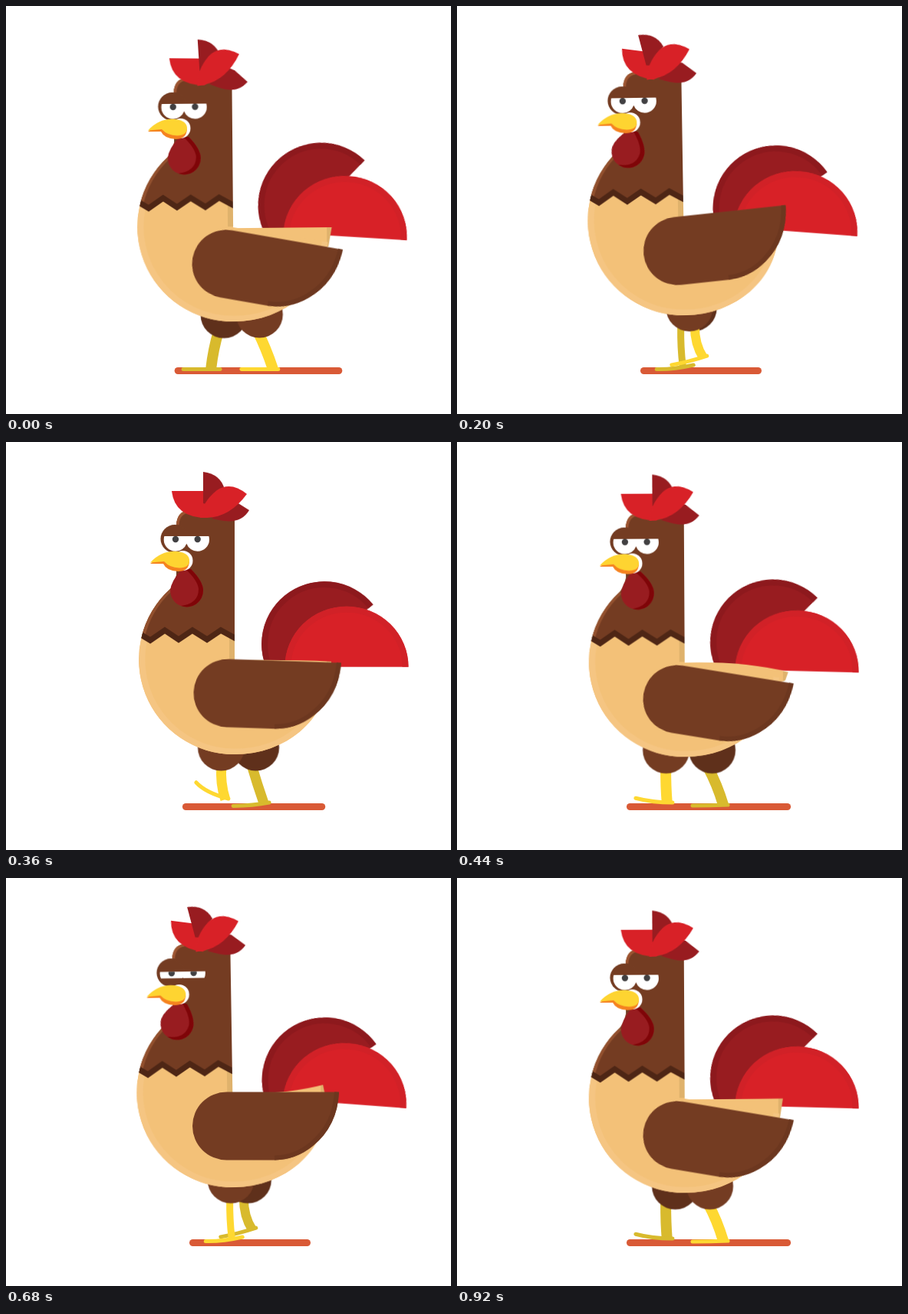
Write an HTML page without scripts that moves like this. It is 580 px wide and 533 px high and loops after 960 ms.

```html
<!DOCTYPE html>
<html lang="en">
<head>
<meta charset="utf-8">
<title>Walking rooster</title>
<style>
html, body { margin: 0; width: 100%; height: 100%; overflow: hidden; background: #fff; }
svg { display: block; width: 580px; height: 533px; }
path, polyline { fill: none; }

/* The body bobs once per step; legs, wings and eyelids need two steps. */
svg * { animation: 480ms linear infinite; }
.body { transform-origin: 290px 330px; animation-name: bob; }
.shadow { stroke: #d95a36; stroke-width: 9; stroke-linecap: round; animation-name: shadow; }
.tail-front { transform-origin: 444px 293px; animation-name: tail-front; }
.tail-back { transform-origin: 415px 264px; animation-name: tail-back; }
.comb path { transform-origin: 258px 99px; }
.comb .left { animation-name: comb-left; }
.comb .mid { animation-name: comb-mid; }
.comb .back { animation-name: comb-back; }
.comb .low { transform-origin: 283px 100px; animation-name: comb-low; }
.wattle { transform-origin: 235px 165px; animation-name: wattle; }

.wing, .far-wing, .shin, .foot, .thigh, .slot { animation-duration: 960ms; }
.wing { transform-origin: 287.5px 324px; animation-name: wing; }
.far-wing { fill: url(#feather); animation-name: far-wing; }
.shin { stroke: var(--skin); animation-name: shin; }
.foot { stroke: var(--skin); stroke-width: 5; stroke-linecap: round; animation-name: foot; }
.near { --skin: #fed831; --thigh: #743c22; }
.far { --skin: #d8ba2d; --thigh: #5f301b; }
.far .shin, .far .foot { animation-delay: -480ms; }
.thigh { fill: var(--thigh); animation-name: near-thigh; }
.far .thigh { animation-name: far-thigh; }
.slot { animation-name: blink; }

.red { fill: #d82127; }
.dark { fill: #981c20; }
.wine { fill: #7f0508; }
.brown { fill: #743c22; }
.orange { fill: #f5821f; }
.yellow { fill: #fed431; }
.rim { stroke-width: 8; }

@keyframes bob {
  0%, 100% { transform: translate(-1.5px, 4.3px) rotate(-.5deg); }
  25% { transform: translate(-2.8px, -.2px) rotate(-1deg); }
  41.67% { transform: translate(-2px, -3.8px) rotate(-.9deg); }
  50% { transform: translate(-1.5px, -4.4px) rotate(-.7deg); }
  75% { transform: none; }
  91.67% { transform: translate(-1px, 3.3px) rotate(-.3deg); }
}
@keyframes shadow {
  0%, 100% { d: path("M224 476.5H434"); }
  41.67% { d: path("M243.5 476.5H392.5"); }
  50% { d: path("M243 476.5H392"); }
  75% { d: path("M234.5 476.5H411.5"); }
  91.67% { d: path("M225.5 476.5H430.5"); }
}
@keyframes tail-front {
  0%, 100% { transform: translate(-2px, 7.3px) rotate(3.5deg); }
  25% { transform: translate(-3px, 3.7px) rotate(4.9deg); }
  41.67% { transform: translate(-2.7px, 1px) rotate(4.3deg); }
  50% { transform: translate(-2.2px, .2px) rotate(3.5deg); }
  75% { transform: none; }
  91.67% { transform: translate(-1px, 5.3px) rotate(1.4deg); }
}
@keyframes tail-back {
  0%, 100% { transform: translate(-4.5px, -3.5px) rotate(-7deg); }
  41.67% { transform: translate(.5px, 0) rotate(4deg); }
  50% { transform: translate(.7px, .3px) rotate(4deg); }
  75% { transform: none; }
  91.67% { transform: translate(-3px, -2.5px) rotate(-6deg); }
}
@keyframes comb-left {
  0%, 100% { transform: rotate(1deg); }
  33%, 41.67% { transform: rotate(8deg); }
  75%, 91.67% { transform: none; }
}
@keyframes comb-mid {
  0%, 100% { transform: rotate(-10deg); }
  41.67% { transform: rotate(-8deg); }
  75% { transform: none; }
  91.67% { transform: rotate(-6deg); }
}
@keyframes comb-back {
  0%, 100% { transform: rotate(-3deg); }
  33%, 41.67% { transform: rotate(-14deg); }
  75%, 91.67% { transform: none; }
}
@keyframes comb-low {
  0%, 100% { transform: rotate(10deg); }
  41.67% { transform: rotate(5deg); }
  75% { transform: none; }
  91.67% { transform: rotate(6deg); }
}
@keyframes wattle {
  0%, 100% { transform: rotate(1deg); }
  41.67% { transform: rotate(17deg); }
  75% { transform: none; }
  91.67% { transform: rotate(-3deg); }
}
@keyframes wing {
  0%, 100% { transform: translate(-.5px, 13px) rotate(10deg); }
  20.83% { transform: translate(0, -4px) rotate(-6.2deg); }
  37.5% { transform: translate(1.5px, 4px) rotate(1.8deg); }
  45.83% { transform: translate(-.5px, 12px) rotate(9.2deg); }
  50% { transform: translate(-.5px, 13px) rotate(10deg); }
  70.83% { transform: none; }
  87.5% { transform: translate(1px, 6px) rotate(5.3deg); }
  95.83% { transform: translate(-.5px, 12px) rotate(9.5deg); }
}
@keyframes far-wing {
  0%, 100% { d: path("M298 286Q365 286 426.5 286L422 311L330 350Z"); }
  20.83% { d: path("M298 286Q370 286 423 280L420 300L330 350Z"); }
  37.5% { d: path("M298 285Q370 284 424 286.5L421 302L330 350Z"); }
  45.83% { d: path("M298 285Q375 283 433 298L429 309L330 350Z"); }
  70.83% { d: path("M298 286Q367 288 416 276L419 292L330 350Z"); }
  87.5% { d: path("M298 286Q370 286 421 279L423 298L330 350Z"); }
  95.83% { d: path("M298 286Q365 286 426 285.5L422 311L330 350Z"); }
}
@keyframes shin {
  0%, 100% { d: path("M328 425Q339 447 348 474"); stroke-width: 14; }
  20.83% { d: path("M310 418Q310 442 321 459"); stroke-width: 12; }
  37.5% { d: path("M281 422Q279 446 286 467"); stroke-width: 13; }
  45.83% { d: path("M272 425Q272 450 274 472"); stroke-width: 14; }
  50% { d: path("M277 425Q270 448 267 474"); stroke-width: 14; }
  70.83% { d: path("M291.5 420Q291 446 294 471"); stroke-width: 9; }
  87.5% { d: path("M320 422Q327 446 336 472"); stroke-width: 13; }
  95.83% { d: path("M327 425Q339 447 347 474"); stroke-width: 14; }
}
@keyframes foot {
  0%, 100% { d: path("M355 474.5Q330 474.5 307 474.5"); }
  20.83% { d: path("M326 457Q302 465 280 469"); }
  37.5% { d: path("M290 466Q260 458 248 444.5"); }
  45.83% { d: path("M281 471Q255 471 233 465"); }
  50% { d: path("M279 474.5Q255 474.5 231 474.5"); }
  70.83% { d: path("M308 469Q282 475 260 474.5"); }
  87.5% { d: path("M343 471Q322 475 296 475.5"); }
  95.83% { d: path("M353 474Q330 475 307 475"); }
}
@keyframes near-thigh {
  0%, 100% { transform: translate(330.5px, 403px); }
  20.83% { transform: translate(303px, 394.5px); }
  25% { transform: translate(297px, 394px); }
  37.5% { transform: translate(280.5px, 399px); }
  45.83% { transform: translate(272.5px, 402.5px); }
  50% { transform: translate(274px, 403.5px); }
  70.83% { transform: translate(293px, 394.5px); }
  75% { transform: translate(300px, 394px); }
  87.5% { transform: translate(321.5px, 399px); }
  95.83% { transform: translate(329.5px, 402.5px); }
}
@keyframes far-thigh {
  0%, 100% { transform: translate(284px, 403.5px); }
  20.83% { transform: translate(308px, 394.5px); }
  25% { transform: translate(313px, 394px); }
  37.5% { transform: translate(325.5px, 399px); }
  45.83% { transform: translate(332.5px, 402.5px); }
  50% { transform: translate(333px, 403.5px); }
  70.83% { transform: translate(315.5px, 394.5px); }
  75% { transform: translate(311px, 394px); }
  87.5% { transform: translate(291.5px, 399px); }
  95.83% { transform: translate(284.5px, 402.5px); }
}
@keyframes blink {
  0%, 62.5%, 83.33%, 100% { y: 123px; height: 22px; }
  70.83%, 75% { y: 125.3px; height: 8.5px; }
}
</style>
</head>
<body>
<svg viewBox="0 0 580 533">
  <defs>
    <linearGradient id="feather">
      <stop offset=".95" stop-color="#f3c178"/>
      <stop offset=".95" stop-color="#dfb26c"/>
    </linearGradient>
    <clipPath id="torso">
      <path d="M298 285V89H238Q223 91 222 108V174Q220 185 214 192A124 124 0 0 0 298 408C366 408 417 362 421 305Z"/>
    </clipPath>
    <clipPath id="eyes">
      <circle cx="221" cy="127.5" r="15.3"/>
      <circle cx="249.7" cy="127.5" r="15.3"/>
    </clipPath>
    <clipPath id="lids">
      <rect class="slot" x="200" y="123" width="70" height="22"/>
    </clipPath>
  </defs>

  <path class="shadow" d="M224 476.5H434"/>

  <g class="far">
    <path class="shin"/><path class="foot"/>
    <circle class="thigh" r="30.5"/>
  </g>
  <g class="near">
    <path class="shin"/><path class="foot"/>
    <circle class="thigh" r="30.5"/>
  </g>

  <g class="tail-back">
    <path class="dark" d="M478.5 212.5A81.5 81.5 0 0 0 351.5 315.5Z"/>
    <path class="rim" stroke="#8d191d" d="M475.5 215A77.5 77.5 0 0 0 354.5 313"/>
  </g>
  <g class="tail-front">
    <path class="red" d="M363.500 293.700A80.500 79 0 0 1 524.500 293.700Z"/>
    <path class="rim" stroke="#d12127" d="M367.500 293.700A76.500 75 0 0 1 520.500 293.700"/>
  </g>

  <g class="body">
    <path class="far-wing"/>
    <g clip-path="url(#torso)">
      <rect x="170" y="85" width="260" height="330" fill="#f3c178"/>
      <path stroke="#f5c582" stroke-width="15" d="M177 256A124 124 0 0 0 298 408C366 408 417 362 421 305"/>
      <path stroke="#dfb26c" stroke-width="7" d="M294.5 250V284"/>
      <path class="brown" d="M170 85H300V256L280 246L262 258L243 246L225 258L207 246L188 259L170 249Z"/>
      <path stroke="#92502e" stroke-width="7" d="M214 192A124 124 0 0 0 177 256"/>
      <path stroke="#9c5431" stroke-width="7" d="M222 108Q223 91 238 89"/>
      <polyline stroke="#4e2615" stroke-width="7.5" points="170,248 188,259 207,246 225,258 243,246 262,258 280,246 300,257"/>
    </g>

    <g class="comb">
      <path class="dark low" d="M268 100L290 75L298 77L317 89Q306 108 278 102Z"/>
      <path class="red left" d="M216 64H262L276 88L262 99Q220 99 216 64Z"/>
      <path class="dark back" d="M257 39Q280 42 285 62L264 82L257 80Z"/>
      <path class="red mid" d="M253 99Q256 78 275 63Q293 51 314 68Q292 98 262 99Z"/>
    </g>

    <circle class="brown" cx="220" cy="126.5" r="18.5"/>
    <g clip-path="url(#lids)">
      <g clip-path="url(#eyes)">
        <rect x="200" y="110" width="70" height="36" fill="#fff"/>
        <circle cx="221" cy="127" r="4.2" fill="#414042"/>
        <circle cx="249.7" cy="127" r="4.2" fill="#414042"/>
      </g>
    </g>

    <g class="wattle">
      <path class="dark" d="M229 166H241Q257 182 257 194A21.3 21.3 0 0 1 214 194Q215 182 229 166Z"/>
      <path class="wine" d="M234 166H241Q257 182 257 194A21.3 21.3 0 0 1 228 214Q251 211 251 192Q250 181 234 166Z"/>
    </g>
    <circle cx="230.5" cy="155" r="13" fill="#fff"/>
    <path class="orange" d="M188 159Q200 148 225 150L239 155Q239 169 224 169Q209 168 205 159Z"/>
    <path class="yellow" d="M188 157.5Q203 141 224 143Q239 145 239 155Q239 164 226 164.5Q213 164 206 156Z"/>
  </g>

  <g class="wing">
    <path class="brown" d="M287.5 279.5H434Q432 324 400 350Q378 368 350 368.5H287.5A44.5 44.5 0 0 1 287.5 279.5Z"/>
    <path stroke="#6c371f" stroke-width="6" d="M431 279.5Q429 322 398 347.5Q377 365 350 365.5"/>
  </g>
</svg>
</body>
</html>
```
